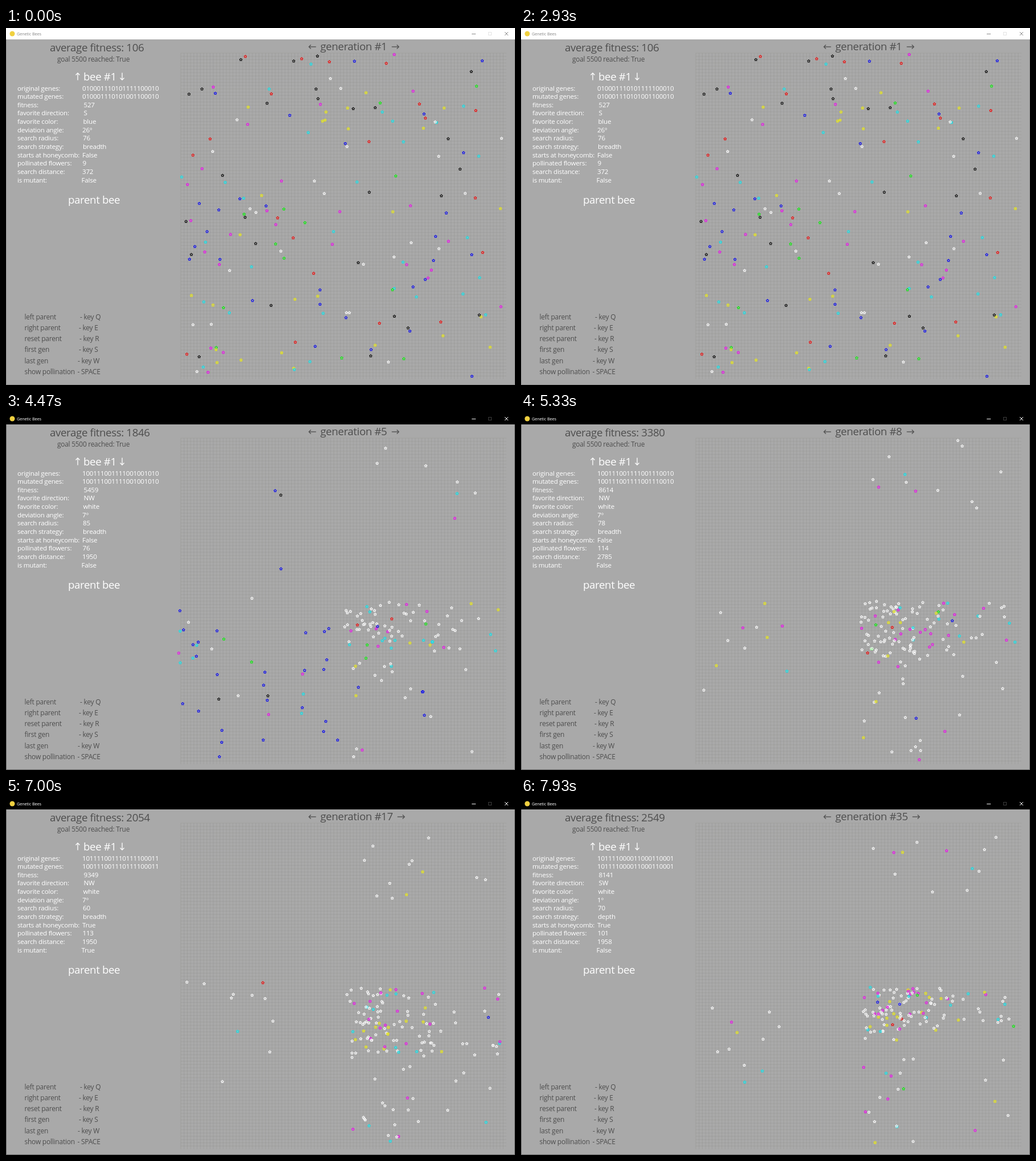
Write an HTML page with a canvas that moves like this. It is 894 px wide and 626 px high and loops after 8 s.

```html
<!DOCTYPE html>
<html lang="en">
<head>
<meta charset="utf-8">
<title>Genetic Bees</title>
<style>
html, body { margin: 0; width: 100%; height: 100%; overflow: hidden; background: #a9a9a9; }
canvas { display: block; width: 894px; height: 626px; }
</style>
</head>
<body>
<canvas id="stage" width="894" height="626"></canvas>
<script>
const ctx = document.getElementById('stage').getContext('2d');
const W = 894, H = 626, LOOP = 8000;
const FIELD = { x: 307, y: 44, size: 572 };
const BG = '#a9a9a9', DARK = '#4e4e4e', LIGHT = '#fff';
const COLORS = {
  black: '#000', blue: '#0000f0', red: '#f00000', green: '#00f000',
  magenta: '#f000f0', yellow: '#f0f000', cyan: '#00e8f0', white: '#fff'
};

// Readouts of the generations where the run pauses
const BEES = {
  1: { avg: 106, genes: '010001110101111100010', mutated: '010001110101001100010', fitness: 527, dir: 'S', color: 'blue',
    angle: 26, radius: 76, strategy: 'breadth', comb: 'False', flowers: 9, distance: 372, mutant: 'False' },
  2: { avg: 461, genes: '100111001111010100010', mutated: '100111001111010100010', fitness: 2535, dir: 'NW', color: 'white',
    angle: 7, radius: 84, strategy: 'breadth', comb: 'False', flowers: 36, distance: 1064, mutant: 'False' },
  8: { avg: 3380, genes: '100111001111001110010', mutated: '100111001111001110010', fitness: 8614, dir: 'NW', color: 'white',
    angle: 7, radius: 78, strategy: 'breadth', comb: 'False', flowers: 114, distance: 2785, mutant: 'False' },
  13: { avg: 2685, genes: '100111001101010101011', mutated: '100111001111010100011', fitness: 7941, dir: 'NW', color: 'white',
    angle: 7, radius: 84, strategy: 'breadth', comb: 'True', flowers: 106, distance: 2658, mutant: 'True' },
  17: { avg: 2054, genes: '101111001110111100011', mutated: '100111001110111100011', fitness: 9349, dir: 'NW', color: 'white',
    angle: 7, radius: 60, strategy: 'breadth', comb: 'True', flowers: 113, distance: 1950, mutant: 'True' },
  35: { avg: 2549, genes: '101111000011000110001', mutated: '101111000011000110001', fitness: 8141, dir: 'SW', color: 'white',
    angle: 1, radius: 70, strategy: 'depth', comb: 'True', flowers: 101, distance: 1958, mutant: 'False' }
};
const KNOWN = Object.keys(BEES).map(Number);

// [time, generation]: linear between the points
const PACE = [[3400, 2], [5300, 8], [5900, 13], [6950, 17], [7900, 35]];
const ACTIVE_AT = 3200, CLICK_END = 3530;

// Colour odds of a generation's flowers
const EVEN = { black: 26, blue: 30, red: 20, green: 18, magenta: 25, yellow: 24, cyan: 26, white: 25 };
const MOSTLY_BLUE = { blue: 15, black: 2, cyan: 3, magenta: 2 };
const MOSTLY_WHITE = { white: 70, magenta: 11, yellow: 9, cyan: 8, green: 2, blue: 1, red: 1 };

function seeded(seed) {
  let s = seed * 7919 + 17;
  return () => {
    s = (s + 0x6D2B79F5) | 0;
    let t = Math.imul(s ^ (s >>> 15), 1 | s);
    t = (t + Math.imul(t ^ (t >>> 7), 61 | t)) ^ t;
    return ((t ^ (t >>> 14)) >>> 0) / 4294967296;
  };
}

function genAt(t) {
  if (t < PACE[0][0]) return 1;
  for (let i = 1; i < PACE.length; i++) {
    const [t0, g0] = PACE[i - 1], [t1, g1] = PACE[i];
    if (t < t1) return Math.floor(g0 + (g1 - g0) * (t - t0) / (t1 - t0));
  }
  return PACE[PACE.length - 1][1];
}

// Between known generations, blend the numbers and vary a few genes.
function getBee(n) {
  if (BEES[n]) return BEES[n];
  const lo = KNOWN.filter(k => k < n).pop(), hi = KNOWN.find(k => k > n);
  const mix = (n - lo) / (hi - lo), a = BEES[lo], b = BEES[hi];
  const rnd = seeded(n);
  const bee = { ...(mix < 0.5 ? a : b) };
  for (const key of ['avg', 'fitness', 'radius', 'flowers', 'distance'])
    bee[key] = Math.round((a[key] + (b[key] - a[key]) * mix) * (0.95 + rnd() * 0.1));
  bee.genes = bee.mutated = bee.genes.replace(/./g, (g, i) => (i > 10 && i < 18 ? Math.round(rnd()) : g));
  return bee;
}

function text(str, x, y, size, color) {
  ctx.font = `${size}px "Open Sans", "Noto Sans", sans-serif`;
  ctx.letterSpacing = `${-0.02 * size}px`;
  ctx.fillStyle = color;
  ctx.fillText(str, x, y);
}

function path(points, color, width = 1) {
  ctx.strokeStyle = color;
  ctx.lineWidth = width;
  ctx.beginPath();
  points.forEach(([x, y]) => ctx.lineTo(x, y));
  ctx.stroke();
}

function arrow(x, y, angle, color) {
  ctx.save();
  ctx.translate(x, y);
  ctx.rotate(angle);
  path([[-6.5, 0], [6, 0]], color, 1.3);
  path([[2.5, -3.5], [6, 0], [2.5, 3.5]], color, 1.3);
  ctx.restore();
}

function disc(x, y, r, color) {
  ctx.fillStyle = color;
  ctx.beginPath();
  ctx.arc(x, y, r, 0, Math.PI * 2);
  ctx.fill();
}

function flower(x, y, name) {
  for (let i = 0; i < 5; i++) {
    const a = -Math.PI / 2 + i * Math.PI * 0.4;
    disc(x + 1.8 * Math.cos(a), y + 1.8 * Math.sin(a), 1, COLORS[name]);
  }
  disc(x, y, 0.8, '#bbb');
}

function drawField() {
  const { x, y, size } = FIELD, step = size / 100, color = 'rgba(120,120,115,.18)';
  for (let d = 0; d <= size; d += step) {
    path([[x + d, y], [x + d, y + size]], color);
    path([[x, y + d], [x + size, y + d]], color);
  }
}

function pick(odds, rnd) {
  const entries = Object.entries(odds);
  let r = rnd() * entries.reduce((sum, [, w]) => sum + w, 0);
  return entries.find(([, w]) => (r -= w) < 0)[0];
}

// Early flowers spread evenly; later ones gather around the hive.
function drawFlowers(n) {
  const rnd = seeded(n);
  const scatter = (count, x0, y0, x1, y1, odds) => {
    for (let i = 0; i < Math.round(count); i++)
      flower(x0 + rnd() * (x1 - x0), y0 + rnd() * (y1 - y0), pick(odds, rnd));
  };
  const { x, y, size } = FIELD;
  if (n === 1) return scatter(194, x, y, x + size, y + size, EVEN);

  const late = Math.min(1, (n - 2) / 6), early = 1 - late;
  for (const column of [308, 333, 376, 457, 524, 562])
    scatter(11 * early, column - 6, 345, column + 6, 605, MOSTLY_BLUE);
  scatter(12 * early, 575, 450, 740, 605, MOSTLY_BLUE);
  scatter(8 * early, 320, 60, 840, 300, MOSTLY_BLUE);
  scatter(30 * early, 585, 345, 680, 455, MOSTLY_WHITE);
  scatter(14 * early, 730, 350, 810, 450, MOSTLY_WHITE);

  const bottom = 432 + 24 * Math.sin((n - 9) / 5);
  scatter(70 * late, 597, 330, 685, bottom, MOSTLY_WHITE);
  scatter(36 * late, 685, 332, 760, bottom, MOSTLY_WHITE);
  scatter(18 * late, 760, 332, 870, bottom, MOSTLY_WHITE);
  scatter(20 * late, 595, bottom, 725, 612, MOSTLY_WHITE);
  scatter(12 * late, 600, 46, 860, 180, MOSTLY_WHITE);
  scatter(11 * late, 312, 320, 470, 500, MOSTLY_WHITE);
  scatter(5 * late, 740, bottom, 860, 600, MOSTLY_WHITE);
}

function drawTitleBar(active) {
  const mark = active ? '#fff' : '#888';
  ctx.lineWidth = 1;
  ctx.strokeStyle = active ? '#666' : '#8a8a8a';
  ctx.strokeRect(0.5, 0.5, W - 1, H - 1);
  ctx.fillStyle = active ? '#000' : '#fff';
  ctx.fillRect(0, 0, W, 20);
  disc(11, 10, 4.5, '#f0d040');
  text('Genetic Bees', 19, 13, 7.4, mark);
  path([[818, 10.5], [825, 10.5]], mark);
  path([[876, 7], [882, 13]], mark);
  path([[882, 7], [876, 13]], mark);
  ctx.strokeStyle = active ? '#3c3c3c' : '#e4e4e4';
  ctx.strokeRect(847.5, 7.5, 5, 5);
}

const ROWS = [
  ['original genes:', 'genes', 134], ['mutated genes:', 'mutated', 134], ['fitness:', 'fitness', 136.5],
  ['favorite direction:', 'dir', 136.5], ['favorite color:', 'color', 135.5], ['deviation angle:', 'angle', 134],
  ['search radius:', 'radius', 135], ['search strategy:', 'strategy', 135], ['starts at honeycomb:', 'comb', 134],
  ['pollinated flowers:', 'flowers', 134.5], ['search distance:', 'distance', 134], ['is mutant:', 'mutant', 132.5]
];
const KEYS = [
  ['left parent', '- key Q', 130], ['right parent', '- key E', 128], ['reset parent', '- key R', 129],
  ['first gen', '- key S', 128], ['last gen', '- key W', 126], ['show pollination', '- SPACE', 125.5]
];

function drawPanel(n) {
  const bee = getBee(n);
  text(`average fitness: ${bee.avg}`, 77, 41, 18.7, DARK);
  text('goal 5500 reached: True', 90, 59, 11.9, DARK);
  arrow(126, 85, -Math.PI / 2, LIGHT);
  text('bee #1', 136, 91.5, 18.7, LIGHT);
  arrow(204, 85, Math.PI / 2, LIGHT);
  ROWS.forEach(([label, key, x], i) => {
    const y = 109.5 + i * 14.66;
    text(label, 20, y, 11.6, LIGHT);
    text(bee[key] + (key === 'angle' ? '°' : ''), x, y, 11.6, LIGHT);
  });
  text('parent bee', 109, 308, 18.7, LIGHT);
  KEYS.forEach(([label, key, x], i) => {
    const y = 511 + i * 19.15;
    text(label, 32.5, y, 12, DARK);
    text(key, x, y, 12, DARK);
  });
  arrow(538, 33, Math.PI, DARK);
  text(`generation #${n}`, 552, 39, 18.7, DARK);
  arrow(n > 9 ? 694 : 684, 33, 0, DARK);
}

function draw(n, active, click) {
  ctx.fillStyle = BG;
  ctx.fillRect(0, 0, W, H);
  drawField();
  drawPanel(n);
  drawFlowers(n);
  if (click) {
    ctx.strokeStyle = '#84504e';
    ctx.lineWidth = 1.6;
    ctx.beginPath();
    ctx.arc(253, 361.5, 4.5, 0, Math.PI * 2);
    ctx.stroke();
  }
  drawTitleBar(active);
}

let shown = '';
function frame(now) {
  const t = now % LOOP, n = genAt(t);
  const active = t >= ACTIVE_AT, click = active && t < CLICK_END;
  const state = [n, active, click].join();
  if (state !== shown) {
    shown = state;
    draw(n, active, click);
  }
  requestAnimationFrame(frame);
}
frame(performance.now());
</script>
</body>
</html>
```
